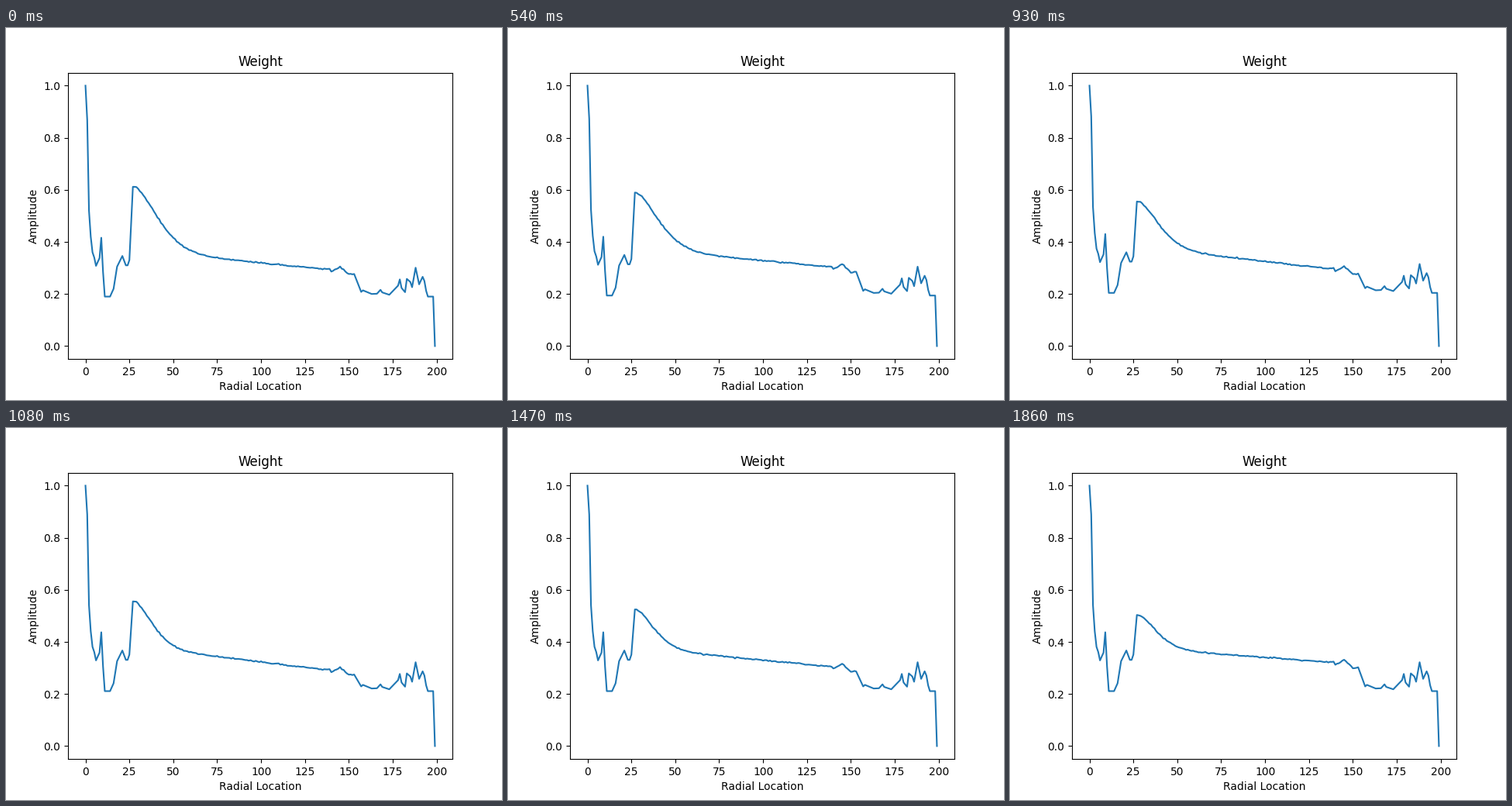
Write a matplotlib script that moves like this. It is 640x480 px and loops after 1.89 s.

```python
import numpy as np
import matplotlib.pyplot as plt
from matplotlib.animation import FuncAnimation

FRAMES, INTERVAL = 63, 30
rng = np.random.default_rng(4)
x = np.arange(200)
hill = slice(27, 154)
xh = x[hill]
grain = rng.normal(0, .0012, (2, xh.size))

# Corner points (x, y) of the parts that keep their shape.
HEAD = [(0, 1), (1, .868), (2, .52), (3, .42), (4, .36), (5, .34), (6, .308),
        (8, .338), (9, .416), (10, .285), (11, .19), (14, .19), (16, .22),
        (18, .305), (21, .346), (23, .31), (24, .31), (25, .33)]
TAIL = [(157, .208), (158, .214), (163, .2), (166, .201), (168, .216),
        (169, .206), (173, .197), (178, .232), (179, .256), (180, .223),
        (182, .207), (183, .258), (185, .246), (186, .226), (188, .301),
        (190, .237), (192, .266), (193, .25), (194, .212), (195, .19),
        (198, .19), (199, 0)]
SHOULDER = [(139, 0), (140, -.01), (143, 0), (145, .009), (150, -.022),
            (153, -.02)]

# Key poses: frame, floor rise, level, tilt, hill height, hill width.
POSES = np.array([
    (0, 0, .296, .00067, .244, 18.2),
    (11, .002, .309, .00057, .250, 16.5),
    (25, .006, .303, .00070, .178, 18),
    (36, .021, .294, .00083, .173, 14),
    (43, .021, .293, .00073, .157, 14),
    (55, .021, .321, .00057, .135, 14),
    (62, .021, .323, .00050, .127, 14)]).T


def through(points, at):
    return np.interp(at, *zip(*points))


ends = through(HEAD + TAIL, x)
bend = through(SHOULDER, xh)


def curve(i):
    rise, level, tilt, height, width = (
        np.interp(i, POSES[0], row) for row in POSES[1:])
    y = ends.copy()
    y[1:199] += rise
    fall = np.exp(-(np.maximum(xh - 28, 0) / width) ** 1.6)
    wobble = np.cos(i / 6) * grain[0] + np.sin(i / 6) * grain[1]
    y[hill] = (level + tilt * np.maximum(135 - xh, 0) + height * fall
               + bend + wobble)
    # Straight links from the hill to both ends.
    for a, b in ((25, 27), (153, 157)):
        y[a:b + 1] = np.linspace(y[a], y[b], b - a + 1)
    return y


fig, ax = plt.subplots(figsize=(6.4, 4.8), dpi=100)
line, = ax.plot(x, curve(0))
ax.set_title("Weight")
ax.set_xlabel("Radial Location")
ax.set_ylabel("Amplitude")


def update(i):
    line.set_ydata(curve(i))
    return line,


anim = FuncAnimation(fig, update, frames=FRAMES, interval=INTERVAL,
                     repeat=True, repeat_delay=0)
plt.show()
```
